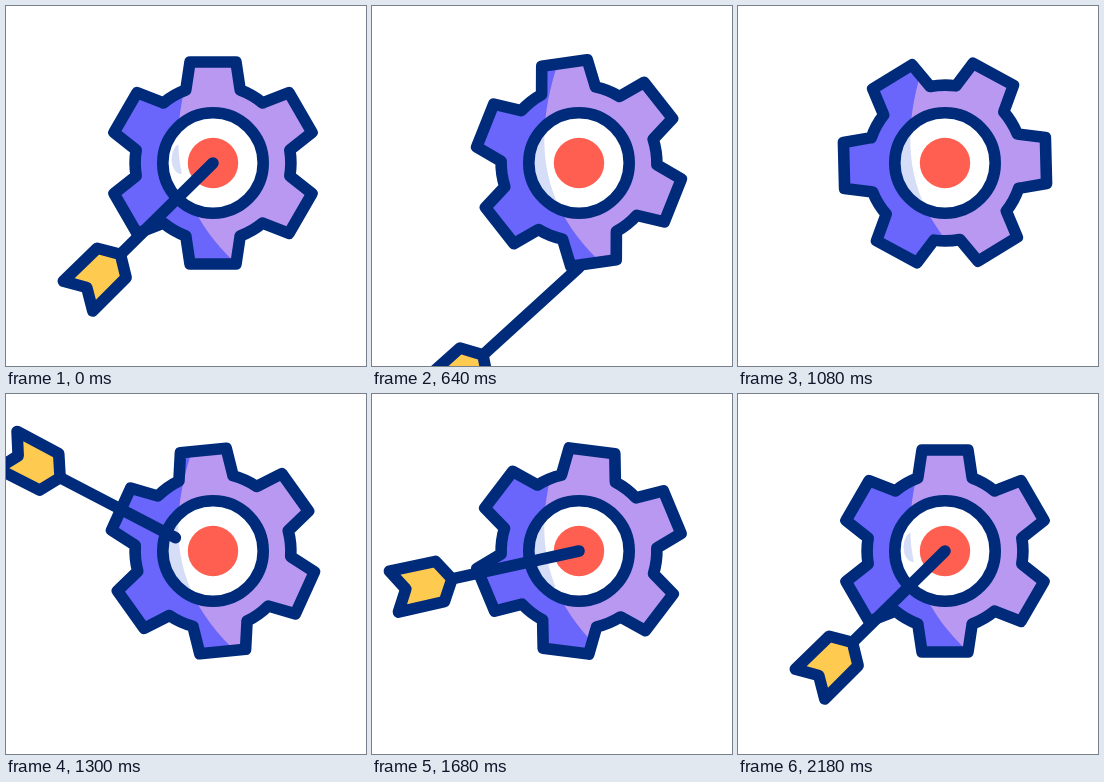
Animation of 360x360 px, one loop 2.36 s. Source, as an HTML page with a canvas:

```html
<!DOCTYPE html>
<html>
<head>
<meta charset="utf-8">
<style>
html, body { margin: 0; width: 100%; height: 100%; overflow: hidden; background: #fff; }
canvas { display: block; width: 360px; height: 360px; }
</style>
</head>
<body>
<canvas id="stage" width="360" height="360"></canvas>
<script>
const LOOP = 2360, CX = 207, CY = 157, LINE = 11.6;
const NAVY = '#002b7a', LILAC = '#b998f2', INDIGO = '#6a65fb';
const RED = '#ff5f51', YELLOW = '#ffca50', SHADE = '#d6def7';
const g = document.getElementById('stage').getContext('2d');
const rad = deg => deg * Math.PI / 180;
const mix = (a, b, p) => a + (b - a) * p;
const ramp = (t, a, b) => Math.min(1, Math.max(0, (t - a) / (b - a)));
const ease = (t, a, b) => { const p = ramp(t, a, b); return p * p * (3 - 2 * p); };

// time, gear angle, angular speed
const turns = [
  [260, 0, 0], [420, 9.5, 0.12], [860, 105, 0.22], [1300, 174.5, 0.06],
  [1520, 201.8, 0.21], [1880, 312.8, 0.28], [2180, 360, 0]
];

function gearAngle(t) {
  const i = turns.findIndex(k => t < k[0]);
  if (i < 1) return 0;
  const [t0, a, u] = turns[i - 1], [t1, b, v] = turns[i];
  const h = t1 - t0, p = (t - t0) / h, q = 1 - p;
  return mix(a, b, p * p * (3 - 2 * p)) + h * p * q * (u * q - v * p);
}

function gearPath(deg) {
  const path = new Path2D();
  for (let i = 0; i < 6; i++) {
    const a = rad(deg + 60 * i), c = Math.cos(a), s = Math.sin(a);
    const half = Math.atan2(27.2, 73), top = a - Math.PI / 2;
    const point = (x, y) => path.lineTo(CX + x * c - y * s, CY + x * s + y * c);
    point(-27.2, -73);
    point(-23, -101);
    point(23, -101);
    point(27.2, -73);
    path.arc(CX, CY, 77.9, top + half, top + Math.PI / 3 - half);
  }
  path.closePath();
  return path;
}

function disc(r) {
  const path = new Path2D();
  path.arc(CX, CY, r, 0, 7);
  return path;
}

const leftSide = new Path2D('M190 45C163 120 159 195 235 262V360H0V0H190Z');
const fletch = new Path2D('M130 0L142.3 20.6L189.5 21L177.3 0L189.5-21L142.3-20.6Z');

function fill(path, color) {
  g.fillStyle = color;
  g.fill(path);
}

function outline(path) {
  g.strokeStyle = NAVY;
  g.stroke(path);
}

function line(x1, y1, x2, y2, color) {
  g.strokeStyle = color;
  g.beginPath();
  g.moveTo(x1, y1);
  g.lineTo(x2, y2);
  g.stroke();
}

function drawGear(t) {
  const gear = gearPath(gearAngle(t));
  fill(gear, LILAC);
  g.save();
  g.clip(gear);
  fill(leftSide, INDIGO);
  g.restore();
  outline(gear);

  const face = disc(50.2);
  fill(face, '#fff');
  const s = ease(t, 260, 640) - ease(t, 1520, 1880);
  const patch = new Path2D();
  patch.ellipse(175, 153 + 8 * s, 9.5 + 11 * s, 15 + 45 * s, 0, 0, 7);
  g.save();
  g.clip(face);
  g.clip(patch);
  fill(leftSide, SHADE);
  g.restore();
  outline(face);
  fill(disc(25.2), RED);
}

function drawArrow(x, y, deg) {
  g.save();
  g.translate(x, y);
  g.rotate(Math.PI - rad(deg));
  line(0, 0, 130, 0, NAVY);
  fill(fletch, YELLOW);
  outline(fletch);
  g.restore();
}

function moveArrow(t) {
  if (t < 1120) {
    const fall = (Math.max(0, t - 260) / 160) ** 2;
    drawArrow(CX, CY + 18.5 * fall, 44.6 - 0.4 * fall);
  } else {
    const p = ramp(t, 1120, 1340);
    const deg = mix(-30, -27, p) + 71.6 * ease(t, 1360, 1960);
    drawArrow(mix(0, CX, p), mix(84, CY, p), deg);
  }
}

// A line whose head runs ahead of its tail
function streak(x1, y1, x2, y2, head, tail) {
  if (head <= tail) return;
  line(mix(x1, x2, tail), mix(y1, y2, tail), mix(x1, x2, head), mix(y1, y2, head), YELLOW);
}

function drawStreaks(t) {
  streak(50, 190, 50, 350, ease(t, 690, 910), ease(t, 770, 990));
  streak(74, 185, 71.5, 285, ease(t, 702, 922), ease(t, 785, 1005));
  const y = CY - 3;
  for (const deg of [-41, 1.5, 46]) {
    const c = Math.cos(rad(deg)), s = Math.sin(rad(deg));
    streak(CX + 33 * c, y + 33 * s, CX + 58 * c, y + 58 * s,
      ease(t, 1400, 1580), ease(t, 1460, 1660));
  }
}

function frame(now) {
  const t = Math.floor(now % LOOP / 20) * 20;
  g.fillStyle = '#fff';
  g.fillRect(0, 0, 360, 360);
  g.lineWidth = LINE;
  g.lineCap = g.lineJoin = 'round';
  drawGear(t);
  moveArrow(t);
  drawStreaks(t);
}

const start = performance.now();
function tick() {
  frame(performance.now() - start);
  requestAnimationFrame(tick);
}
tick();
</script>
</body>
</html>
```
